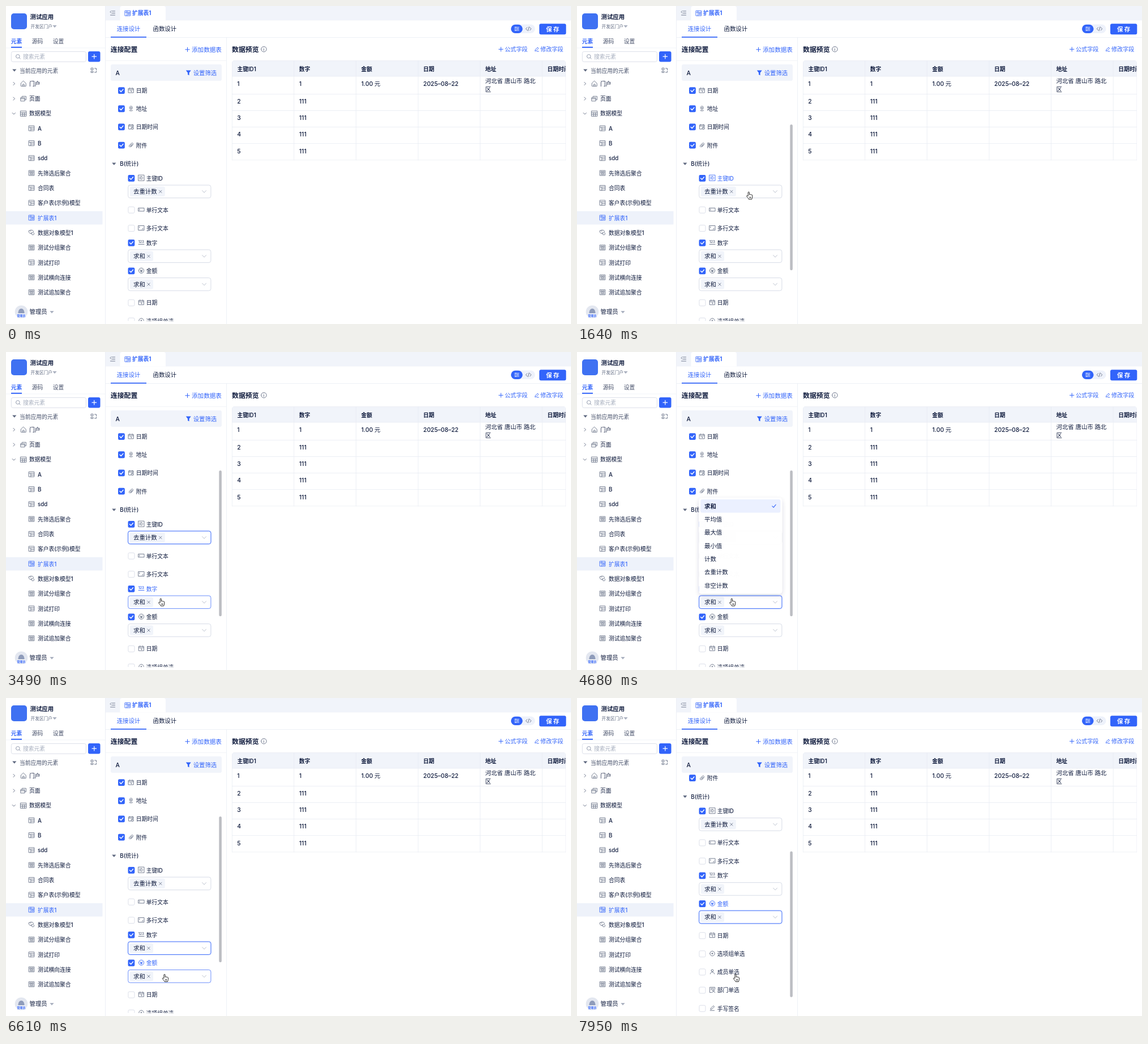
An HTML page that plays this animation: 998 px wide and 561 px high, repeating every 7.99 s.

```html
<!DOCTYPE html>
<html lang="zh">
<head>
<meta charset="utf-8">
<style>
html, body { margin: 0; width: 100%; height: 100%; overflow: hidden; background: #fff; }
svg { display: block; width: 100vw; height: 100vh; }
text { font-family: Inter, 'Noto Sans CJK SC', 'Noto Sans CJK', sans-serif; white-space: pre; }
</style>
</head>
<body>
<svg id="stage" viewBox="0 0 998 561"></svg>
<script>
const LOOP = 7990;
const BLUE = '#3264fa', INK = '#0f1b3d', GRAY = '#5f6980', PALE = '#f1f4fa', LINE = '#e7ebf3', EDGE = '#d3d9e5';
const S = 9.75, M = 10.4;

const text = (x, y, s, size = S, fill = INK, weight = 500, extra = '') =>
  `<text x="${x}" y="${y + size * 0.37}" font-size="${size}" fill="${fill}" font-weight="${weight}" ${extra}>${s}</text>`;
const rect = (x, y, w, h, fill, r = 0, extra = '') =>
  `<rect x="${x}" y="${y}" width="${w}" height="${h}" rx="${r}" fill="${fill}" ${extra}/>`;
const path = (d, color, w = 0.9, extra = '') =>
  `<path d="${d}" fill="none" stroke="${color}" stroke-width="${w}" stroke-linecap="round" stroke-linejoin="round" ${extra}/>`;
const line = (x1, y1, x2, y2, color = LINE, w = 0.8) => path(`M${x1} ${y1}L${x2} ${y2}`, color, w);
const caret = (x, y, color = GRAY) => `<path d="M${x - 3.6} ${y - 2}h7.2l-3.6 4.2z" fill="${color}"/>`;

// icon outlines, centred on 0,0
const ICONS = {
  table: 'M-4.6-4.4h9.2v8.8h-9.2zM-4.6-1.6h9.2M-1.4-1.6v6M-1.4 1.4h6',
  group: 'M-4.6-4.4h9.2v8.8h-9.2zM-2.8-2.6h2v2h-2zM.9-2.6h2v2h-2zM-2.8 1h5.7M-2.8 2.7h5.7',
  extend: 'M-4.6-4.4h9.2v8.8h-9.2zM-4.6-1.6h9.2M-1.4-4.4v8.8M1-.2h2v2.6h-2z',
  model: 'M-1-1.8l-1.8-1.8h-2l-.1 2.6 2 2.4h2.2M-2.6-4.4h4l2 2.4-1.8 2.4h-2.4M-.6 1.2l1.6 2.6h2.4l1.2-1.8-1-1.8',
  home: 'M-4.4-.6v5h8.8v-5L0-4.6zM-1.3 4.4V1h2.6v3.4',
  pages: 'M-4.6-1.8h6.8v6h-6.8zM-2.6-1.8v-2.4h7.2v6.2H2.2M-4.6.2h6.8',
  grid: 'M-5-4.6H5v9.2H-5zM-5-1.6H5M-5 1.4H5M-1.7-1.6v6.2M1.7-1.6v6.2',
  date: 'M-4.4-3.6h8.8v7.6h-8.8zM-4.4-1.2h8.8M-2.2-4.6v1.6M2.2-4.6v1.6M-.8.8H.8V2.6',
  place: 'M0 2.2C-4-1-3-4.4 0-4.4S4-1 0 2.2zM-1-1.4a1 1 0 1 0 2 0a1 1 0 1 0-2 0M-2.6 2.6c-3 1.8 8.2 1.8 5.2 0',
  time: 'M4.2-.6v-3h-8.4v7.4h4M-4.2-1.4h8M-2.2-4.5v1.5M2.2-4.5v1.5M.2 2.3a2.2 2.2 0 1 0 4.4 0a2.2 2.2 0 1 0-4.4 0M2.4 1.2v1.2h.8',
  clip: 'M2.6-1.2L-.8 2.6C-2.2 4-4.4 2.2-3 .6L.8-3.4C2.2-4.8 4.8-2.8 3.4-1L0 3M1.2-1.8L-1.6 1.2',
  id: 'M-5-5H5V5H-5zM-2.8-2.4v4.8M-.6-2.4v4.8h1c3 0 3-4.8 0-4.8z',
  single: 'M-5-2.8H5v5.6H-5zM-3.2-1.2v2.4',
  multi: 'M-5-4H5v8H-5zM-3.2-2.2v2M1.2 2.4l2-2M2.8 2.4l.4-.4',
  money: 'M-4.6 0a4.6 4.6 0 1 0 9.2 0a4.6 4.6 0 1 0-9.2 0M-2.2-2L0 .2 2.2-2M0 .2V2.8M-2 .2h4M-1.6 1.5h3.2',
  radio: 'M-4.2 0a4.2 4.2 0 1 0 8.4 0a4.2 4.2 0 1 0-8.4 0M-1 0a1 1 0 1 0 2 0a1 1 0 1 0-2 0M-.4 0h.8',
  person: 'M-1.9-2a1.9 1.9 0 1 0 3.8 0a1.9 1.9 0 1 0-3.8 0M-3.6 4C-3.4-.4 3.4-.4 3.6 4',
  dept: 'M4.6-1v-3.6h-9.2v9.2h3M-2.6-2.6h5.2M-2.6-.6h2M.6.8a1.5 1.5 0 1 0 3 0a1.5 1.5 0 1 0-3 0M-.4 4.8c.2-2.8 4.8-2.8 5 0',
  sign: 'M-3 2l.4-2L2-4.2l1.8 1.6L-.8 1.6zM-3.8 4.2h7.4',
};
const icon = (name, x, y, color = GRAY) => name === 'num'
  ? `<g stroke="none">${text(x - 5.2, y - 1.6, '123', 6, color, 600)}</g>${line(x - 5, y + 3.2, x + 5, y + 3.2, color, 0.9)}`
  : path(ICONS[name], color, 0.85, `transform="translate(${x} ${y})"`);

const check = (x, y, on) => on
  ? rect(x, y - 5.9, 11.8, 11.8, BLUE, 2.2) + path(`M${x + 3} ${y}l2.2 2.3 3.8-4.4`, '#fff', 1.4)
  : rect(x + .4, y - 5.5, 11, 11, '#fff', 2, `stroke="${EDGE}" stroke-width=".8"`);

function sidebar() {
  let s = line(175.5, 0, 175.5, 561);
  s += rect(9, 13, 28, 28, '#3f71f2', 5);
  s += text(42.5, 19, '测试应用', M, INK, 700) + text(43.5, 36, '开发区门户', 7.7, GRAY) + caret(86, 36, '#a9b0bf');
  s += text(8.8, 62.5, '元素', S, BLUE, 700) + text(45.8, 62.5, '源码', S, '#46506a') + text(82.8, 62.5, '设置', S, '#46506a');
  s += line(0, 74, 175, 74, '#eef1f7') + rect(9, 71.8, 19, 2, BLUE);
  s += rect(9.4, 80.4, 132, 18, '#fff', 3, `stroke="${EDGE}" stroke-width=".8"`);
  s += path('M17.5 88.8a3.3 3.3 0 1 0 6.6 0a3.3 3.3 0 1 0-6.6 0M23.3 91.2l2 2', '#8b94a8') + text(30, 89, '搜索元素', S, '#a5adbd');
  s += rect(145, 80, 21.5, 18.5, BLUE, 3) + path('M152 89.2h7.6M155.8 85.4v7.6', '#fff', 1.2);
  s += caret(14.8, 113.5) + text(24, 114, '当前应用的元素', S, '#46506a');
  s += path('M150.5 109.5h3.4v3h-3.4zM150.5 115h3.4v2.4h-3.4zM156.5 110h3v3M156.5 117h3v-2', GRAY);
  [['home', '门户', 137], ['pages', '页面', 163.5], ['grid', '数据模型', 189.8]].forEach(([ic, label, y], i) => {
    s += path(i < 2 ? `M13 ${y - 2.6}l2.5 2.6-2.5 2.6` : `M11.2 ${y - 1.3}l2.6 2.6 2.6-2.6`, GRAY);
    s += icon(ic, 30.8, y) + text(41, y, label);
  });
  s += rect(0, 362, 170.5, 23.5, '#eef2fa');
  ['A', 'B', 'sdd', '先筛选后聚合', '合同表', '客户表(示例)模型', '扩展表1', '数据对象模型1', '测试分组聚合', '测试打印', '测试横向连接', '测试追加聚合']
    .forEach((label, i) => {
      const y = 216.2 + i * 26.3, c = i === 6 ? BLUE : INK;
      const ic = i === 6 ? 'extend' : i === 7 ? 'model' : /聚合|连接/.test(label) ? 'group' : 'table';
      s += icon(ic, 45.2, y - .5, i === 6 ? BLUE : GRAY) + text(56, y, label, S, c);
    });
  s += '<circle cx="27" cy="539.5" r="11.3" fill="#e3e7f0"/><path d="M21.5 542c0-11 11-11 11 0z" fill="#8f9cba"/>';
  s += rect(18.5, 542.3, 17, 6.6, '#edf0f7', 2) + text(19.6, 545.7, '管理员', 4.9, BLUE, 700);
  return s + text(41.5, 539.3, '管理员', M) + caret(81, 540, '#a9b0bf');
}

function header() {
  let s = rect(176, 0, 822, 25.5, PALE);
  s += '<path d="M201.5 25.5V4q0-4 4-4h72.500q4 0 4 4v21.500z" fill="#fff"/>';
  s += path('M187.500 9h5M187.500 12.500h5M184.500 16h8M186 8.500l-2 2 2 2', GRAY);
  s += icon('extend', 215, 12.8, BLUE) + text(223, 12.8, '扩展表1', S, BLUE, 700);
  s += line(176, 55.6, 998, 55.6);
  s += text(195.7, 40.3, '连接设计', M, BLUE) + text(259.5, 40.3, '函数设计', M) + rect(185, 54, 63, 1.7, BLUE);
  s += rect(891.5, 32.5, 43, 15.6, '#eef2fb', 7.8) + rect(892, 32.700, 20.500, 15.200, BLUE, 7.6);
  s += path('M898.300 37.600h7.800M898.300 40.300h7.800M898.300 43h7.800M900.500 37v1.200M904 39.700v1.200M900.500 42.400v1.200', '#fff', 0.9);
  s += path('M920.700 37.700l-2.500 2.600 2.500 2.600M925.200 37.700l2.500 2.600-2.500 2.600M924 36.800l-2 7', GRAY);
  return s + rect(942, 31.3, 47.300, 19, BLUE, 3) + text(954, 41, '保 存', M, '#fff', 700);
}

function preview() {
  let s = text(399, 76.3, '数据预览', 11.9, INK, 700);
  s += path('M450.700 76.200a4.700 4.700 0 1 0 9.400 0a4.700 4.700 0 1 0-9.400 0M455.400 75.600v3M455.400 73.700v.1', GRAY);
  s += path('M870.500 76.300h7.400M874.200 72.600v7.400', BLUE, 1) + text(881, 76.300, '公式字段', 10.1, BLUE);
  s += path('M934.500 79.200l.5-2.300 4-3.900 1.700 1.700-4 4zM937.500 80h3.500', BLUE) + text(944, 76.300, '修改字段', 10.1, BLUE);
  s += `<g clip-path="url(#tableBox)">${rect(399, 96, 600, 28, PALE)}`;
  const cols = [399.4, 508.700, 618.300, 728, 837.500, 947.200];
  ['主键ID1', '数字', '金额', '日期', '地址', '日期时间'].forEach((h, i) => {
    s += text(cols[i] + 9, 111.3, h, S, INK, 600) + line(cols[i], 96, cols[i], 272);
  });
  [96.300, 124, 155.500, 184.500, 213.500, 242.600, 271.900].forEach(y => s += line(399, y, 990, y));
  s += line(988.900, 96, 988.900, 272);
  [137.500, 168, 197.300, 226.500, 255.700].forEach((y, i) =>
    s += text(408.200, y, i + 1, M) + text(517.800, y, i ? '111' : '1', M));
  s += text(627.500, 137.500, '1.00 元', M) + text(737, 137.500, '2025–08–22', M);
  return s + text(846.600, 131.700, '河北省 唐山市 路北', M) + text(846.600, 147, '区', M) + '</g>';
}

function panelHead() {
  let s = line(389.6, 56, 389.6, 561) + line(176, 96.300, 389, 96.300, '#eef1f7');
  s += text(184.800, 76.300, '连接配置', 11.9, INK, 700);
  s += path('M316.800 76.800h7.400M320.500 73.100v7.400', BLUE, 1) + text(328, 76.800, '添加数据表', 10.6, BLUE);
  s += rect(185, 103, 196, 29, PALE, 3) + text(193.500, 117.800, 'A', M);
  s += `<path d="M317.800 113.500h9l-3.200 4.200v4.600l-2.600-1.300v-3.300z" fill="${BLUE}"/>`;
  return s + text(330.700, 117.800, '设置筛选', M, BLUE);
}

const FIELDS = [
  ['id', '主键ID', 304, '去重计数'], ['single', '单行文本', 360], ['multi', '多行文本', 392.300],
  ['num', '数字', 418, '求和'], ['money', '金额', 467.600, '求和'], ['date', '日期', 523.800],
  ['radio', '选项组单选', 556], ['person', '成员单选', 588], ['dept', '部门单选', 620.100], ['sign', '手写签名', 652.300],
];

function selectBox(y, value) {
  const w = value.length * M + 20.500;
  let s = `<g class="box">${rect(215, y - 12, 147.600, 23.800, 'none', 4, 'class="glow" stroke="#3264fa" stroke-opacity=".13" stroke-width="1.600"')}`;
  s += rect(215.700, y - 11.400, 146.200, 22.600, '#fff', 3.500, 'class="edge" stroke-width=".9"') + '</g>';
  s += rect(218.700, y - 8.800, w, 17.400, PALE, 3) + text(225, y, value, M);
  const cx = 218.700 + w - 8;
  s += path(`M${cx - 2.200} ${y - 2.200}l4.400 4.400m0-4.400l-4.400 4.400`, GRAY, 0.8);
  return s + path(`M346.700 ${y - 1.800}l3.400 3.600 3.400-3.600`, '#b6bdca', 0.9);
}

function fields() {
  let s = '';
  [['date', '日期'], ['place', '地址'], ['time', '日期时间'], ['clip', '附件']].forEach(([ic, label], i) => {
    const y = 149.500 + i * 32.150;
    s += check(198, y - .4, true) + icon(ic, 220.800, y - .5) + text(229.700, y, label);
  });
  s += caret(190.800, 278.500) + text(201.300, 278.500, 'B(统计)');
  FIELDS.forEach(([ic, label, y, value], i) => {
    s += check(215.500, y - .2, value);
    s += `<g class="name">${icon(ic, 239, y - .8)}${text(247.700, y, label)}</g>`;
    s += `<g class="name" display="none">${icon(ic, 239, y - .8, BLUE)}${text(247.700, y, label, S, BLUE)}</g>`;
    if (value) s += selectBox(y + 23.400, value);
  });
  return s;
}

const COUNTS = ['计数', '去重计数', '非空计数'];
const SUMS = ['求和', '平均值', '最大值', '最小值', ...COUNTS];
const ROW = 23.400;
// list, chosen item, top edge, hinge line, open start/end, close start/end
const MENUS = [
  [COUNTS, 1, 342, 342, 1840, 2000, 2490, 2610],
  [SUMS, 0, 257, 426.500, 3610, 3770, 4680, 4840],
  [SUMS, 0, 306.600, 476, 6730, 6890, 7340, 7460],
];
function menu([items, chosen, top]) {
  let s = `<g class="menu">${rect(215.300, top, 147, items.length * ROW + 5.800, '#fff', 5, 'filter="url(#shade)"')}`;
  items.forEach((label, i) => {
    const y = top + 2.900 + ROW * (i + .5);
    if (i === chosen) {
      s += rect(218.200, y - ROW / 2, 141.200, ROW, '#ebf0ff', 3) + path(`M344.800 ${y}l2.400 2.400 3.900-4.900`, BLUE, 1.100);
    }
    s += text(225, y, label, M, INK, i === chosen ? 700 : 500);
  });
  return s + '</g>';
}

const stage = document.getElementById('stage');
stage.innerHTML = `<defs>
  <clipPath id="tableBox"><path d="M399 272.400V101q0-5 5-5h580q5 0 5 5v171.400z"/></clipPath>
  <clipPath id="listBox"><rect x="176" y="132.500" width="213" height="423"/></clipPath>
  <filter id="shade" x="-20%" y="-20%" width="140%" height="140%"><feDropShadow dx="0" dy="3" stdDeviation="4" flood-color="#1a2a50" flood-opacity=".16"/></filter>
</defs>${rect(0, 0, 998, 561, '#fff')}${sidebar()}${header()}${preview()}${panelHead()}
<g clip-path="url(#listBox)"><g id="list">${fields()}</g></g>
${rect(376.300, 209, 4.600, 257.300, '#bcbec3', 2.300, 'id="bar"')}
${MENUS.map(menu).join('')}
<g id="cursor">
  <path id="arrow" d="M0 0V11.300L2.600 9 4.300 12.700 6 12 4.400 8.400H8z" fill="#111" stroke="#fff" stroke-width=".7"/>
  <path id="hand" transform="translate(-4.100 -.4)" d="M3 7.600V1.500a1.100 1.100 0 0 1 2.200 0V5.200a1 1 0 0 1 1.900.2a1 1 0 0 1 1.800.4a1 1 0 0 1 1.700.8V9.400c0 1.800-1 2.400-1.200 4H4.200C4 12 2 10.300.6 8.400C-.2 7.200 1.200 6.400 2 7.100zM5.800 9v2.600M7.600 9v2.600" fill="#fff" stroke="#111" stroke-width=".9" stroke-linejoin="round"/>
</g>`;

const $ = id => document.getElementById(id);
const all = q => [...stage.querySelectorAll(q)];
const names = all('.name'), edges = all('.edge'), glows = all('.glow'), menus = all('.menu');
const BOXES = [327.400, 441.400, 491];

// time, x, y of the pointer tip
const TRAIL = [
  [250, 545, 496], [370, 401, 409], [620, 401, 409], [1100, 304, 328], [1640, 303.300, 328], [2570, 303.300, 328],
  [3250, 274, 429], [3290, 274, 429], [3450, 273.300, 435], [5210, 273.300, 435], [5370, 268, 415.800], [5650, 264, 391],
  [5810, 264, 391], [6250, 280, 485], [6490, 280, 485], [6570, 280, 487.500], [LOOP, 280, 487.500],
];
const ramp = (t, a, b) => Math.min(1, Math.max(0, (t - a) / (b - a)));
const smooth = k => k * k * (3 - 2 * k);
const easeOut = k => 1 - (1 - k) ** 2;

function tip(t) {
  const i = Math.max(1, TRAIL.findIndex(p => p[0] > t));
  const [a, x, y] = TRAIL[i - 1], [b, u, v] = TRAIL[i];
  const k = (i === 1 ? easeOut : smooth)(ramp(t, a, b));
  return [x + (u - x) * k, y + (v - y) * k];
}
const rowAt = y => [345, 376, 405, 457, 507].findIndex(end => y < end);
const show = (el, on) => el.setAttribute('display', on ? 'inline' : 'none');

function draw(t) {
  const [x, y] = tip(t), live = t >= 1640;
  show($('cursor'), t >= 250);
  show($('arrow'), !live);
  show($('hand'), live);
  $('cursor').setAttribute('transform', `translate(${x} ${y})`);

  const hover = live ? rowAt(y) : -1;
  names.forEach((el, i) => show(el, (i >> 1 === hover) === (i % 2 === 1)));

  const focus = [1760, 3650, 6770].filter(s => t >= s).length - 1;
  edges.forEach((el, i) => {
    const over = t >= 1680 && Math.abs(y - BOXES[i]) < 11.800;
    el.setAttribute('stroke', i === focus ? BLUE : over ? '#5b82fb' : EDGE);
    show(glows[i], i === focus);
  });

  menus.forEach((el, i) => {
    const [, , , hinge, a, b, c, d] = MENUS[i];
    const k = easeOut(ramp(t, a, b)) * (1 - ramp(t, c, d));
    show(el, k > 0);
    el.setAttribute('opacity', k);
    el.setAttribute('transform', `translate(0 ${hinge}) scale(1 ${0.8 + 0.2 * k}) translate(0 ${-hinge})`);
  });

  const scroll = smooth(ramp(t, 7760, 7950));
  $('list').setAttribute('transform', `translate(0 ${-104.400 * scroll})`);
  $('bar').setAttribute('y', 209 + 61.400 * scroll);
  show($('bar'), live);
}

const start = performance.now();
function tick(now) {
  draw(Math.max(0, now - start) % LOOP);
  requestAnimationFrame(tick);
}
draw(0);
requestAnimationFrame(tick);
</script>
</body>
</html>
```
